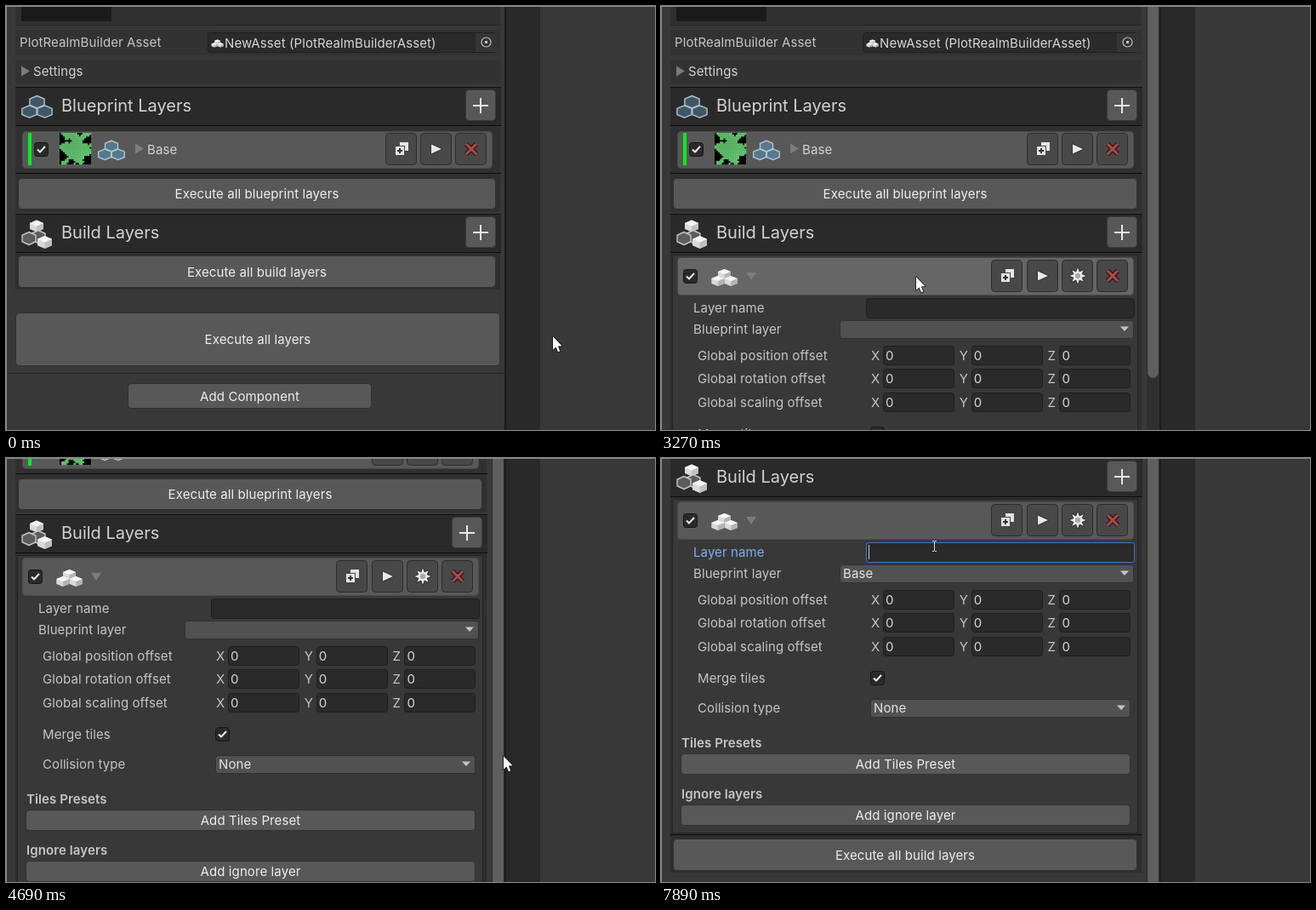
Recreate the animation shown at these times as an HTML page with a canvas. Size 763 by 498 pixels, loop 8 s.

```html
<!DOCTYPE html>
<html lang="en">
<head>
<meta charset="utf-8">
<title>Layer editor</title>
<style>
html, body { margin: 0; width: 100%; height: 100%; overflow: hidden; background: #383838; }
canvas { display: block; }
</style>
</head>
<body>
<canvas id="stage" width="763" height="498"></canvas>
<script>
const ctx = document.getElementById('stage').getContext('2d');
const LOOP = 8000;
const UI = 'Inter, sans-serif', MENU = '"Open Sans", "Noto Sans", sans-serif';

// time, x, y of the pointer; it jumps from one position to the next
const POINTER = [
  [0, 643, 388], [280, 666, 318], [400, 622, 243], [550, 575, 247], [670, 527, 254], [790, 557, 261],
  [1400, 572, 274], [1520, 587, 286], [1640, 597, 297], [1760, 602, 302],
  [2540, 520, 306], [2660, 420, 311], [2780, 340, 316], [2900, 300, 318],
  [3390, 285, 292], [3510, 240, 258], [3630, 193, 231], [3780, 330, 222], [3900, 490, 211], [4020, 578, 219],
  [4270, 577, 240], [4420, 577, 271], [4570, 580, 310], [4690, 585, 350], [4810, 590, 385], [4930, 592, 397],
  [5080, 595, 412], [5200, 597, 425], [5320, 597, 434], [5590, 584, 430], [5730, 450, 300], [5860, 333, 186],
  [6010, 294, 147], [6160, 281, 140], [6280, 275, 136],
  [7020, 300, 148], [7140, 317, 154], [7380, 320, 140], [7500, 322, 112], [7740, 322, 104], [7890, 321, 103]
];
const SCROLL = [[0, 0], [4270, 28], [4420, 70], [4570, 122], [4690, 178], [4810, 226], [4930, 244]];

const at = (keys, t) => keys.filter(k => k[0] <= t).pop();

function rect(x, y, w, h, color) {
  ctx.fillStyle = color;
  ctx.fillRect(x, y, w, h);
}

function box(x, y, w, h, fill, line, r = 3) {
  ctx.beginPath();
  ctx.roundRect(x + .5, y + .5, w - 1, h - 1, r);
  ctx.fillStyle = fill;
  ctx.fill();
  if (line) {
    ctx.strokeStyle = line;
    ctx.lineWidth = 1;
    ctx.stroke();
  }
}

// the line lies under the fill, so only its outer half shows
function poly(points, fill, line, width = 1) {
  ctx.beginPath();
  points.forEach(([x, y]) => ctx.lineTo(x, y));
  ctx.closePath();
  if (line) {
    ctx.strokeStyle = line;
    ctx.lineWidth = width;
    ctx.lineJoin = 'round';
    ctx.stroke();
  }
  if (fill) {
    ctx.fillStyle = fill;
    ctx.fill();
  }
}

function text(str, x, cy, { size = 15, color = '#c6c6c6', align = 'left', weight = 400, font = UI, gap = .1 } = {}) {
  ctx.font = `${weight} ${size}px ${font}`;
  ctx.letterSpacing = gap + 'px';
  ctx.textAlign = align;
  ctx.fillStyle = color;
  ctx.fillText(str, x, Math.round(cy + size * .36));
}

function button(x, y, w, h, label) {
  box(x, y, w, h, '#585858', '#303030', 4);
  text(label, x + w / 2, y + h / 2 + .5, { color: '#eeeeee', align: 'center' });
}

const field = (x, y, w, h) => box(x, y, w, h, '#2a2a2a', '#1f1f1f');

function arrowDown(x, y) {
  poly([[x - 5, y - 3], [x + 5, y - 3], [x, y + 2.5]], '#c4c4c4');
}

function dropdown(x, y, w, label) {
  box(x, y, w, 22, '#515151', '#303030');
  if (label) text(label, x + 4, y + 10.5, { color: '#e4e4e4' });
  arrowDown(x + w - 11, y + 10.5);
}

function check(x, y) {
  box(x, y, 17, 17, '#2a2a2a', '#161616');
  ctx.beginPath();
  ctx.moveTo(x + 4, y + 8.5);
  ctx.lineTo(x + 7, y + 11.5);
  ctx.lineTo(x + 13, y + 5);
  ctx.strokeStyle = '#eee';
  ctx.lineWidth = 2;
  ctx.stroke();
}

function hexPoints(x, y, w, h) {
  return [[x, y - h], [x + w, y - h / 2], [x + w, y + h / 2], [x, y + h], [x - w, y + h / 2], [x - w, y - h / 2]];
}

function hexTrio(x, y, k, fill, line) {
  [[0, -6.3], [-9, 5], [9, 5]].forEach(([dx, dy]) => {
    const points = hexPoints(x + dx * k, y + dy * k, 8.6 * k, 7.2 * k);
    poly(points, fill);
    poly(points, null, line, 1.4);
  });
}

function cube(x, y, w, h, top, side, front) {
  poly(hexPoints(x, y, w, h), front);
  poly([[x, y], [x + w, y - h / 2], [x + w, y + h / 2], [x, y + h]], side);
  poly([[x, y - h], [x + w, y - h / 2], [x, y], [x - w, y - h / 2]], top);
}

function cubeTrio(x, y, k) {
  [[0, -4], [-7.7, 4], [7.7, 4]].forEach(([dx, dy]) =>
    cube(x + dx * k, y + dy * k, 7.5 * k, 6 * k, '#f6f6f6', '#b4b4b4', '#dadada'));
}

function buildIcon(x, y) {
  const hollow = (cx, cy) => {
    poly(hexPoints(cx, cy, 8, 7.5), '#5c5c5c');
    poly(hexPoints(cx, cy, 8, 7.5), null, '#c4c4c4', 1.4);
  };
  cube(x + 1, y - 9.5, 8, 7, '#f6f6f6', '#c0c0c0', '#dadada');
  hollow(x + 3, y + 3);
  hollow(x - 8, y + 5);
  cube(x + 10.5, y + 9.5, 8.5, 7.5, '#f6f6f6', '#c0c0c0', '#dadada');
}

function map(x, y) {
  rect(x, y, 37, 37, '#000');
  const n = 18, cell = 37 / n;
  const bays = [[0, 3, 3], [5, 4, 1.3], [15, 4, 2.4], [11, 0, 1.6], [1, 13, 3], [6, 16, 1.8], [16, 15, 3]];
  let seed = 11;
  for (let j = 0; j < n; j++) for (let i = 0; i < n; i++) {
    seed = (seed * 1103 + 12345) % 65536;
    const noise = seed / 65536;
    const edge = Math.min(i, j + 1, n - 1 - i, n - 1 - j);
    const wet = bays.some(([a, b, r]) => Math.hypot(i - a, j - b) < r * (.75 + noise * .4));
    if (!wet && edge + noise > .5) rect(x + i * cell, y + j * cell, cell + .3, cell + .3, '#62c06e');
  }
}

function plus(x, y, hot) {
  box(x, y, 36, 37, hot ? '#737373' : '#585858', '#3a3a3a', 4);
  rect(x + 9, y + 18, 18, 2, '#e8e8e8');
  rect(x + 17, y + 10, 2, 18, '#e8e8e8');
}

const GLYPHS = {
  copy(x, y) {
    rect(x - 2, y - 8, 10, 10, '#e4e4e4');
    rect(x - 8, y - 4, 12, 12, '#484848');
    rect(x - 7, y - 3, 10, 10, '#e4e4e4');
    rect(x - 5, y + 1, 6, 2, '#333');
    rect(x - 3, y - 1, 2, 6, '#333');
  },
  play(x, y) {
    poly([[x - 6, y - 5.5], [x + 6, y], [x - 6, y + 5.5]], '#e8e8e8', '#333', 2);
  },
  burst(x, y) {
    const points = Array.from({ length: 16 }, (_, i) => {
      const r = i % 2 ? 5 : 9.5, a = i * Math.PI / 8;
      return [x + r * Math.sin(a), y - r * Math.cos(a)];
    });
    poly(points, '#e8e8e8', '#333', 2);
    poly(hexPoints(x, y, 3, 3.4), '#a8a8a8');
  },
  remove(x, y) {
    [['#1c1c1c', 5.6], ['#b54743', 3]].forEach(([color, width]) => {
      ctx.beginPath();
      ctx.moveTo(x - 6, y - 6); ctx.lineTo(x + 6, y + 6);
      ctx.moveTo(x + 6, y - 6); ctx.lineTo(x - 6, y + 6);
      ctx.strokeStyle = color;
      ctx.lineWidth = width;
      ctx.stroke();
    });
  }
};

function tools(right, y, names) {
  names.forEach((name, i) => {
    const x = right - 44 - Math.round((names.length - 1 - i) * 41.2);
    box(x, y, 37, 38, '#484848', '#2c2c2c', 4);
    GLYPHS[name](x + 19, y + 19);
  });
}

function foldout(x, y, open) {
  poly(open ? [[x - 6, y - 4], [x + 6, y - 4], [x, y + 5]] : [[x - 4, y - 6], [x + 6, y], [x - 4, y + 6]], '#7c7c7c');
}

function header(y, edge, title, hot) {
  rect(11, y, edge - 11, 46, '#2a2a2a');
  rect(11, y, edge - 11, 1, '#111');
  rect(11, y + 45, edge - 11, 1, '#0c0c0c');
  text(title, 65, y + 22, { size: 20, color: '#d2d2d2', gap: 0 });
  plus(edge - 42, y + 3, hot);
}

function topPart(edge) {
  const w = edge - 12;
  rect(11, 0, w, 23, '#303030');
  rect(11, 22, w, 1, '#242424');
  rect(18, 0, 106, 18, '#1a1a1a');
  rect(11, 28, w, 30, '#323232');
  text('PlotRealmBuilder Asset', 16, 43);
  field(237, 31, edge - 242, 24);
  cubeTrio(248.5, 44, .46);
  text('NewAsset (PlotRealmBuilderAsset)', 257, 43.5, { color: '#d6d6d6' });
  const cx = edge - 17.5;
  rect(cx - 12.5, 32, 25, 22, '#353535');
  ctx.beginPath();
  ctx.arc(cx, 42.5, 5.5, 0, 7);
  ctx.strokeStyle = '#c4c4c4';
  ctx.lineWidth = 1.2;
  ctx.stroke();
  rect(cx - 1.5, 41, 3, 3, '#c4c4c4');
  rect(11, 63, w, 28, '#323232');
  foldout(22, 76.5);
  text('Settings', 32, 77, { color: '#d2d2d2' });
}

function blueprintPart(edge) {
  rect(11, 141, edge - 12, 101, '#303030');
  header(95, edge, 'Blueprint Layers');
  hexTrio(36.5, 119, 1, '#405767', '#b4c4d0');
  box(19, 147, edge - 29, 44, '#585858', '#4a4a4a', 4);
  rect(26, 149, 4, 38, '#00f01c');
  check(33, 160);
  map(63, 149);
  hexTrio(124, 170, .87, '#55788d', '#b0c6d4');
  foldout(156, 167.5);
  text('Base', 166, 169, { color: '#d2d2d2' });
  tools(edge - 10, 149, ['copy', 'play', 'remove']);
  rect(11, 196, edge - 11, 1, '#0c0c0c');
  button(14, 202, edge - 20, 37, 'Execute all blueprint layers');
}

function layerRow(edge, open, lit) {
  box(19, 295, edge - 29, 45, lit ? '#666666' : '#585858', '#4a4a4a', 4);
  check(26, 309);
  cubeTrio(74.5, 319, 1);
  foldout(106, 317, open);
  tools(edge - 10, 298, ['copy', 'play', 'burst', 'remove']);
}

function layerBody(state) {
  text('Layer name', 38, 355, { color: state.focus ? '#80aef0' : '#c6c6c6' });
  box(241, 343, 316, 24, '#2a2a2a', state.focus ? '#3a79bb' : '#1f1f1f');
  if (state.focus) rect(244, 346, 1, 17, '#c8c8c8');
  text('Blueprint layer', 38, 380);
  dropdown(210, 369, 346, state.picked && 'Base');
  ['position', 'rotation', 'scaling'].forEach((kind, i) => {
    const cy = 411 + Math.round(i * 27.4);
    text(`Global ${kind} offset`, 43, cy);
    ['X', 'Y', 'Z'].forEach((axis, j) => {
      const x = 247 + j * 103.7;
      text(axis, x, cy);
      field(Math.round(x + 14), cy - 12, 84, 23);
      text('0', x + 17, cy, { color: '#d6d6d6' });
    });
  });
  text('Merge tiles', 43, 503);
  check(246, 494);
  text('Collision type', 43, 538);
  dropdown(246, 527, 306, 'None');
  [['Tiles Presets', 'Add Tiles Preset', 579], ['Ignore layers', 'Add ignore layer', 639]].forEach(([name, action, y]) => {
    text(name, 24, y, { weight: 600 });
    button(23, y + 12, 529, 25, action);
  });
}

function buildPart(edge, state) {
  const grow = state.open ? 398 : state.added ? 57 : 0;
  rect(11, 290, edge - 12, 43 + grow, '#2e2e2e');
  header(244, edge, 'Build Layers', state.hot);
  buildIcon(35, 268);
  if (state.open) box(13, 292, edge - 18, 393, '#383838', '#242424', 2);
  if (state.added) {
    layerRow(edge, state.open, state.lit);
    rect(11, 288 + grow, edge - 11, 1, '#0c0c0c');
  }
  if (state.open) layerBody(state);
  button(14, 293 + grow, edge - 20, 38, 'Execute all build layers');
  button(11, 360 + grow, edge - 12, 63, 'Execute all layers');
  rect(1, 431 + grow, 585, 1, '#222');
  button(143, 443 + grow, 287, 30, 'Add Component');
}

function panel(state) {
  const edge = state.open ? 566 : 582;
  ctx.save();
  ctx.beginPath();
  ctx.rect(1, 1, 585, 497);
  ctx.clip();
  ctx.translate(0, -state.scroll);
  topPart(edge);
  blueprintPart(edge);
  buildPart(edge, state);
  ctx.restore();
  if (state.open) {
    rect(571, 1, 15, 497, '#2f2f2f');
    box(572, -20, 13, 457 + state.scroll * .743, '#5f5f5f', '#5a5a5a', 6);
  }
}

function menuBox(x, y, w, h) {
  rect(x + 2, y + 2, w, h, 'rgba(0,0,0,.35)');
  rect(x, y, w, h, '#a2a2a2');
  rect(x + 1, y + 1, w - 2, h - 2, '#f1f1f1');
}

function menuItem(label, x, y, w, textX, lit) {
  if (lit) rect(x, y, w, 24, '#91c9f7');
  text(label, textX, y + 12.8, { size: 14.2, color: '#111', font: MENU, gap: 0 });
}

function addMenu(second) {
  menuBox(557, 261, 149, 54);
  menuItem('Objects', 560, 264, 143, 594, !second);
  menuItem('3D Tiles', 560, 288, 143, 594, second);
}

function layerMenu(t) {
  const fading = t < 6770;
  ctx.globalAlpha = fading ? .3 : 1;
  menuBox(275, 135, 127, 30);
  ctx.globalAlpha = fading ? .75 : 1;
  menuItem('Base', 278, 138, 121, 312, t >= 7020);
  ctx.globalAlpha = 1;
}

function arrow(x, y) {
  const shape = [[0, 0], [0, 15.4], [3.5, 12.2], [6, 18], [8.3, 17], [5.9, 11.3], [10.6, 11]];
  poly(shape.map(([a, b]) => [x + a, y + .3 + b]), '#fff', '#111', 1.6);
}

function beam(x, y) {
  rect(x, y - 5, 1, 11, '#ddd');
  [-6, 6].forEach(d => {
    rect(x - 2, y + d, 2, 1, '#ddd');
    rect(x + 1, y + d, 2, 1, '#ddd');
  });
}

function draw(t) {
  const [, x, y] = at(POINTER, t);
  rect(0, 0, 763, 498, '#383838');
  rect(586, 0, 42, 498, '#292929');
  rect(586, 0, 2, 498, '#1c1c1c');
  panel({
    scroll: at(SCROLL, t)[1],
    hot: t >= 790 && t < 2160,
    added: t >= 2280,
    open: t >= 3150,
    lit: t >= 3150 && t < 3510,
    picked: t >= 7260,
    focus: t >= 7620
  });
  rect(0, 0, 763, 1, '#8c8c8c');
  rect(0, 0, 1, 498, '#8c8c8c');
  if (t >= 1160 && t < 2160) addMenu(t >= 1640);
  if (t >= 6650 && t < 7260) layerMenu(t);
  if (t >= 7500) beam(x, y);
  else arrow(x, y);
}

function tick() {
  draw(performance.now() % LOOP);
  requestAnimationFrame(tick);
}
tick();
</script>
</body>
</html>
```
